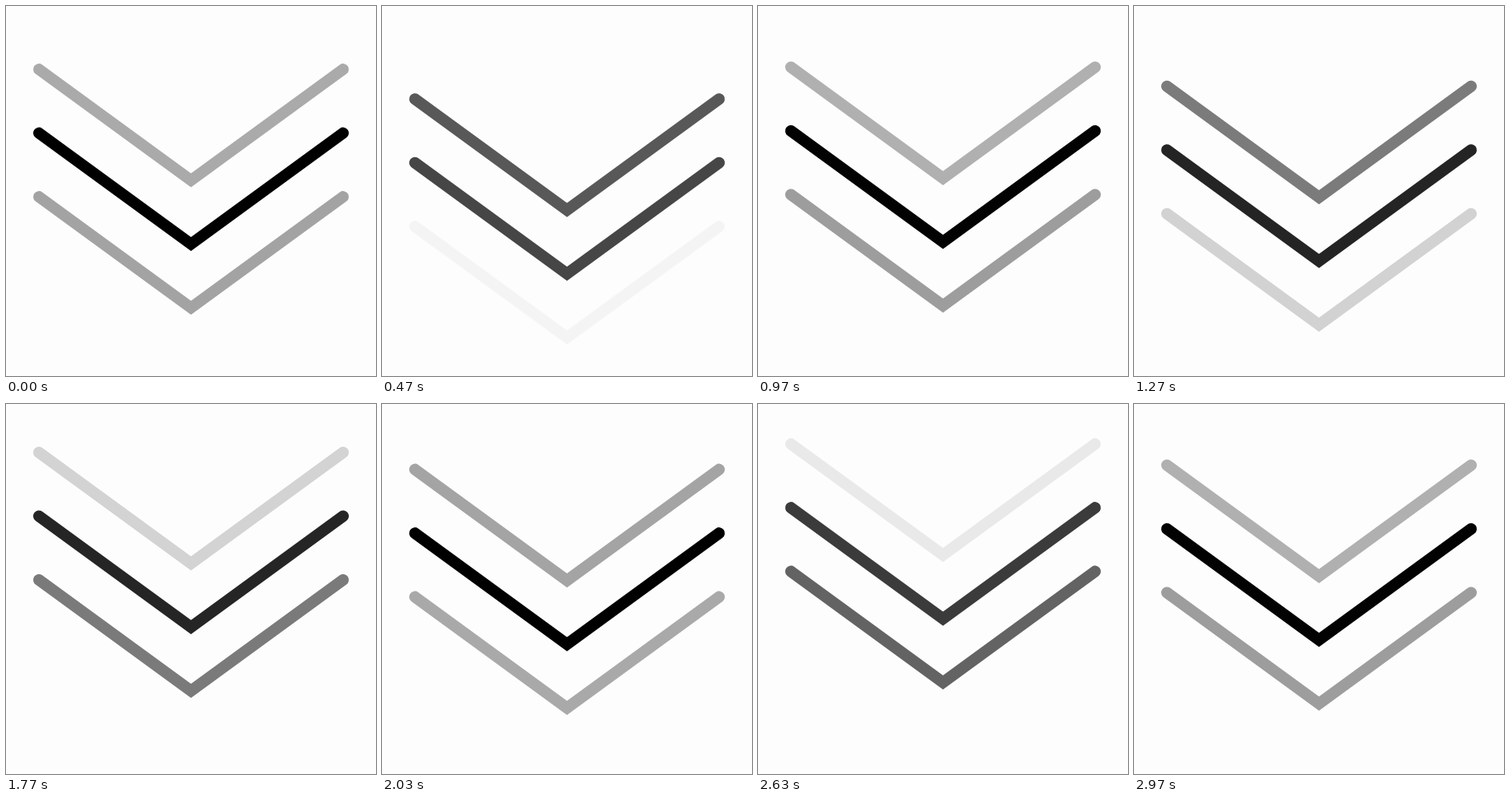
These frames come from a looping animation (450 by 450 pixels, 3010 ms). An HTML page with a canvas:

```html
<!DOCTYPE html>
<html lang="en">
<head>
<meta charset="utf-8">
<title>Scroll chevrons</title>
<style>
  html, body { margin: 0; width: 100%; height: 100%; overflow: hidden; background: #fdfdfd; }
  canvas { display: block; width: 450px; height: 450px; }
</style>
</head>
<body>
<canvas id="stage" width="450" height="450"></canvas>
<script>
const ctx = document.getElementById('stage').getContext('2d');
const LOOP = 3010, STEPS = 90;
const GAP = 77.5, SPAN = GAP * 3;
const TOP = 38.75, PEAK = 156;

// 30 steps per second, on a 10 ms clock
function stepAt(ms) {
  const t = Math.floor((ms % LOOP) / 10) * 10;
  return Math.min(STEPS - 1, Math.floor((t + 4) * 0.03));
}

function chevron(y) {
  const fade = 1 - Math.abs(y - PEAK) / (SPAN / 2);
  ctx.globalAlpha = Math.max(0, Math.min(1, fade * 1.03));
  ctx.beginPath();
  ctx.moveTo(40, y);
  ctx.lineTo(225, y + 135);
  ctx.lineTo(410, y);
  ctx.stroke();
}

function draw(now) {
  const shift = stepAt(now) * SPAN / STEPS;
  ctx.globalAlpha = 1;
  ctx.fillStyle = '#fdfdfd';
  ctx.fillRect(0, 0, 450, 450);
  ctx.strokeStyle = '#000';
  ctx.lineWidth = 13.9;
  ctx.lineCap = 'round';
  ctx.lineJoin = 'miter';
  for (let i = 0; i < 3; i++) {
    chevron(TOP + (38.25 + i * GAP + shift) % SPAN);
  }
}

const start = performance.now();
function tick() {
  draw(performance.now() - start);
  requestAnimationFrame(tick);
}
tick();
</script>
</body>
</html>
```
